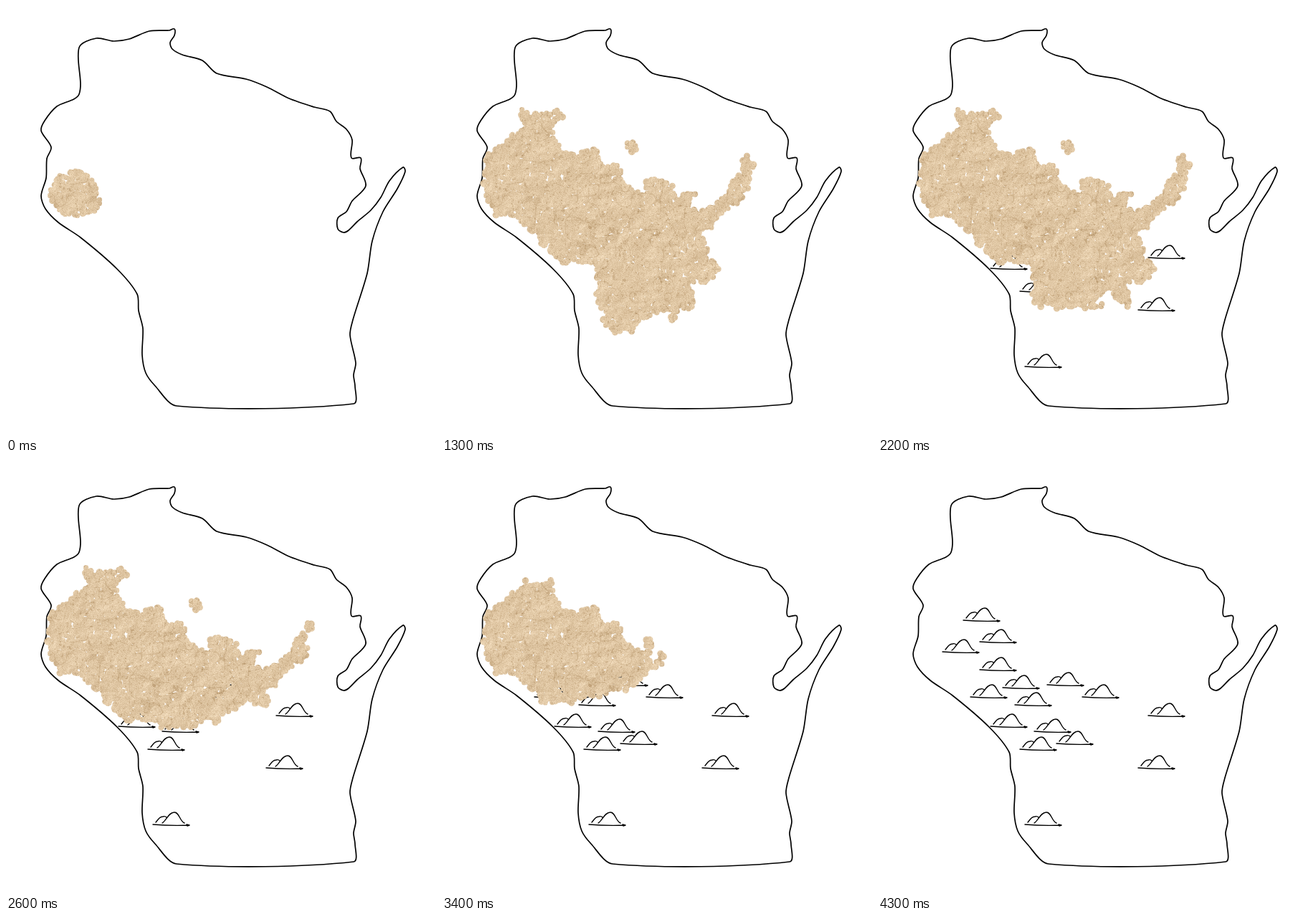
An HTML page with a canvas that plays this animation: 600x600 px, repeating every 5.3 s.

```html
<!DOCTYPE html>
<html lang="en">
<head>
<meta charset="utf-8">
<title>Sand map</title>
<style>
  html, body { margin: 0; width: 100%; height: 100%; overflow: hidden; background: #fff; }
  canvas { display: block; }
</style>
</head>
<body>
<canvas id="stage" width="600" height="600"></canvas>
<script>
const LOOP = 5300, STEP = 100, LAST_STEP = 43;
const ctx = document.getElementById('stage').getContext('2d');

const border = [
  [228,34],[235,32],[235,41],[229,51],[232,60],[246,68],[274,76],[294,94],[335,102],[364,113],
  [395,129],[430,141],[452,147],[461,161],[475,172],[483,187],[482,212],[495,212],[494,227],
  [502,251],[483,272],[475,287],[463,296],[463,311],[471,316],[478,313],[490,301],[509,285],
  [523,267],[535,244],[554,225],[557,231],[546,255],[526,287],[511,328],[504,373],[484,438],
  [480,459],[488,498],[485,515],[487,530],[485,555],[238,558],[208,530],[195,512],[190,487],
  [191,450],[185,425],[183,402],[155,367],[104,323],[73,302],[55,283],[49,265],[56,240],
  [57,213],[63,197],[49,174],[54,160],[71,140],[102,123],[102,58],[126,45],[150,49],[172,46],
  [200,35]
];

// Widest extent of the sand, with two loose crumbs
const extent = new Path2D(
  'M60 275L58 245L63 210L92 183L113 172L109 143L123 151L164 143L171 158L155 165L155 185' +
  'L190 214L195 200L216 200L225 222L246 220L262 257L285 264L280 252L300 243L318 247L326 263' +
  'L354 262L342 281L362 284L395 266L415 233L424 208L437 214L425 262L385 295L372 314L360 310' +
  'L370 350L388 367L372 388L344 388L354 430L340 455L325 450L310 425L286 433L272 457L236 464' +
  'L216 405L218 378L208 358L160 356L130 320L105 298L72 294Z' +
  'M248 189L272 188L268 208ZM285 476L298 456L328 460L326 473Z');

// Left ends of the hills' base lines, in order of appearance
const hills = [
  [205,503],[363,424],[377,351],[157,366],[198,398],[218,373],[285,325],[249,390],
  [191,336],[129,325],[174,312],[236,308],[142,287],[142,248],[119,218],[90,262]
];
const hillStep = i => 14 + i * 1.8;

const hash = (x, y) => {
  const s = Math.sin(x * 127.1 + y * 311.7) * 43758.5453;
  return s - Math.floor(s);
};
const mix = (a, b, k) => a + (b - a) * k;
const ease = k => k * k * (3 - 2 * k);

function noise(x, y, size) {
  x /= size; y /= size;
  const i = Math.floor(x), j = Math.floor(y), u = ease(x - i), v = ease(y - j);
  return mix(mix(hash(i, j), hash(i + 1, j), u), mix(hash(i, j + 1), hash(i + 1, j + 1), u), v);
}

// Grainy relief lit from the upper left, with creases and pits
function makeSand(w, h) {
  const canvas = document.createElement('canvas');
  canvas.width = w; canvas.height = h;
  const c = canvas.getContext('2d'), image = c.createImageData(w, h);
  const height = (x, y) => noise(x, y, 19) * 45 + noise(x, y, 6) * 14;
  for (let y = 0, p = 0; y < h; y++) {
    for (let x = 0; x < w; x++, p += 4) {
      const slope = height(x + 2, y + 2) - height(x, y);
      const crease = Math.abs(noise(x, y, 15) - 0.5) < 0.025 ? -14 : 0;
      const pit = noise(x, y, 2.6) > 0.83 ? -20 : 0;
      const light = slope * 1.3 + (hash(x, y) - 0.5) * 24 + crease + pit;
      image.data.set([224 + light * 0.85, 199 + light, 164 + light * 1.15, 255], p);
    }
  }
  c.putImageData(image, 0, 0);
  return ctx.createPattern(canvas, 'repeat');
}

// Distance from where the sand starts, with weights for going up and down
const distance = (x, y, up, down) => Math.hypot(x - 95, (y - 272) * (y < 272 ? up : down));

const growRadius = step => 36 + 24 * step;

function shrinkRadius(step) {
  const keys = [[17, 700], [26, 335], [34, 205], [LAST_STEP, 0]];
  const i = Math.max(1, keys.findIndex(([s]) => step <= s));
  const [[s0, r0], [s1, r1]] = [keys[i - 1], keys[i]];
  return mix(r0, r1, (step - s0) / (s1 - s0));
}

function makeCrumbs(spacing) {
  const crumbs = [];
  for (let gy = 135; gy < 485; gy += spacing) {
    for (let gx = 50; gx < 445; gx += spacing) {
      const x = gx + (hash(gx, gy) - 0.5) * spacing, y = gy + (hash(gy, gx) - 0.5) * spacing;
      const warpX = (noise(x, y, 9) - 0.5) * 9, warpY = (noise(y, x, 9) - 0.5) * 9;
      if (!ctx.isPointInPath(extent, x + warpX, y + warpY)) continue;
      const rough = 0.92 + 0.16 * noise(x, y, 14);
      crumbs.push({
        x, y, r: 3.5 + 1.5 * hash(x, y),
        near: distance(x, y, 0.9, 1.7) * rough,
        far: distance(x, y, 1.9, 3.2) * rough
      });
    }
  }
  return crumbs;
}

function smoothLoop(points) {
  const path = new Path2D(), n = points.length, at = i => points[(i + n) % n];
  path.moveTo(...at(0));
  for (let i = 0; i < n; i++) {
    const [a, b, c, d] = [at(i - 1), at(i), at(i + 1), at(i + 2)];
    const reach = 0.28 * Math.hypot(c[0] - b[0], c[1] - b[1]);
    const angle = (p, q) => Math.atan2(q[1] - p[1], q[0] - p[0]);
    const t1 = angle(a, c), t2 = angle(b, d);
    path.bezierCurveTo(
      b[0] + reach * Math.cos(t1), b[1] + reach * Math.sin(t1),
      c[0] - reach * Math.cos(t2), c[1] - reach * Math.sin(t2), ...c);
  }
  return path;
}

const sand = makeSand(450, 500);
const crumbs = makeCrumbs(5);
const outline = smoothLoop(border);
const hill = new Path2D(
  'M0 0 Q25 2 51 1 M47 0 L51 1 L48 2 ' +
  'M4 -3 C8 -8 10 -11 14 -11 Q17 -12 19 -10 ' +
  'M13 -2 C19 -6 22 -17 30 -17 C37 -17 37 -5 44 -2');

function drawSand(step) {
  const grown = growRadius(step), left = shrinkRadius(step);
  ctx.beginPath();
  for (const { x, y, r, near, far } of crumbs) {
    if (near > grown || far > left) continue;
    ctx.moveTo(x + r, y);
    ctx.arc(x, y, r, 0, 2 * Math.PI);
  }
  ctx.fillStyle = sand;
  ctx.fill();
}

function draw(step) {
  ctx.fillStyle = '#fff';
  ctx.fillRect(0, 0, 600, 600);
  ctx.strokeStyle = '#000';
  ctx.lineCap = ctx.lineJoin = 'round';
  ctx.lineWidth = 1.7;
  ctx.stroke(outline);
  ctx.lineWidth = 1.4;
  hills.forEach(([x, y], i) => {
    if (step < hillStep(i)) return;
    ctx.save();
    ctx.translate(x, y);
    ctx.stroke(hill);
    ctx.restore();
  });
  if (step < LAST_STEP) drawSand(step);
}

function tick() {
  draw(Math.floor(performance.now() % LOOP / STEP));
  requestAnimationFrame(tick);
}
tick();
</script>
</body>
</html>
```
